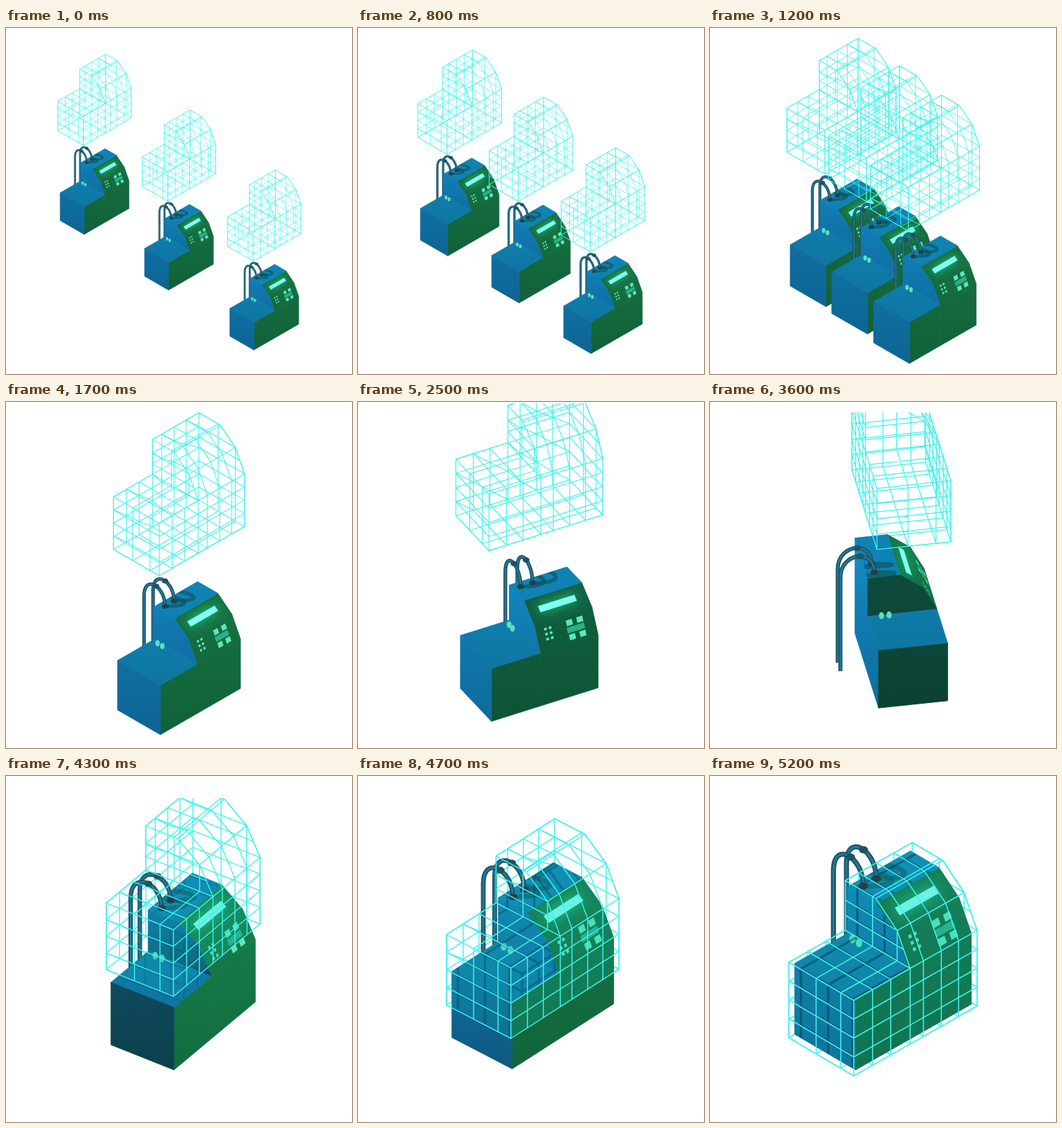
Animation, 500 px wide and 500 px high, one loop 5300 ms. Source, as an HTML page with a canvas:

```html
<!DOCTYPE html>
<html lang="en">
<head>
<meta charset="utf-8">
<style>
  html, body { margin: 0; width: 100%; height: 100%; overflow: hidden; background: #fff; }
  canvas { display: block; width: 500px; height: 500px; }
</style>
</head>
<body>
<canvas id="stage" width="500" height="500"></canvas>
<script>
const ctx = document.getElementById('stage').getContext('2d');
const LOOP = 5300, STEP = 100;

// Key poses, joined by monotone cubic curves.
const TIMES = [0, 500, 800, 1200, 1700, 2500, 3000, 3300, 3600, 4300, 4800, 5200];
const TRACKS = {
  size:   [49, 51.5, 56, 73, 87.6, 93.9, 97, 99.3, 101.7, 110.7, 119, 125.5],
  x:      [250, 250, 250, 250, 250, 247.5, 250, 298, 276.5, 256, 252, 250],
  y:      [350, 355, 364.5, 399.5, 429.5, 413.5, 398, 390, 383, 357.5, 353, 351.5],
  angle:  [45, 45, 45, 45, 45, 28.6, -30, -190, -259.7, -304.6, -313, -315.5],
  lift:   [2.66, 2.66, 2.66, 2.66, 2.66, 2.66, 2.62, 2.5, 2.29, 1, 0.3, -0.03],
  spread: [122, 122, 103, 60, 0, 0, 0, 0, 0, 0, 0, 0],
  clip:   [0, 0, 0, 0, 0, 2, 1, 5, 15, 32, 50, 60]
};

function sample(values, t) {
  let i = 0;
  while (i < TIMES.length - 2 && t > TIMES[i + 1]) i++;
  const slope = k => (values[k + 1] - values[k]) / (TIMES[k + 1] - TIMES[k]);
  const tangent = k => {
    if (k === 0 || k === TIMES.length - 1) return 0;
    const a = slope(k - 1), b = slope(k);
    return a * b > 0 ? 2 * a * b / (a + b) : 0;
  };
  const d = TIMES[i + 1] - TIMES[i], p = (t - TIMES[i]) / d, q = 1 - p;
  return values[i] * q * q * (1 + 2 * p) + values[i + 1] * p * p * (1 + 2 * q)
    + d * p * q * (tangent(i) * q - tangent(i + 1) * p);
}

// The machine: two prisms along its length, each with a (width, height) profile.
const LENGTH = 1.87, STEPBACK = 0.855, ROOF = 1.66;
const BOX = [[0, 0], [0, 1], [1, 1], [1, 0]];
const HOOD = [[0, 0], [0, 1], [0.2, 1.4], [0.53, ROOF], [1, ROOF], [1, 0]];
const ROWS = [0.25, 0.5, 0.75, 1, 1.2, 1.4], RIBS = [0.2, 0.58];
const COLUMNS = [0, 0.153, 0.3, 0.457, 0.565, 0.71, 0.85, 1].map(c => c * LENGTH);

function prism(profile, from, to) {
  return profile.map((p, i) => {
    const q = profile[(i + 1) % profile.length];
    const dw = q[0] - p[0], dh = q[1] - p[1];
    const at = (l, k) => [l, p[0] + dw * k, p[1] + dh * k];
    const rows = dw === 0 ? ROWS.map(h => (h - p[1]) / dh)
      : dh === 0 ? RIBS.map(w => (w - p[0]) / dw) : [];
    const cuts = rows.filter(k => k > 0 && k < 1);
    const columns = COLUMNS.filter(c => c > from + 0.01 && c < to - 0.01);
    const lines = cuts.map(k => [at(from, k), at(to, k)])
      .concat(columns.map(c => [at(c, 0), at(c, 1)]));
    const braces = [];
    if (p[0] === 1 && dw === 0) {
      const ks = [0, ...cuts.sort((a, b) => a - b), 1], cs = [from, ...columns, to];
      for (let c = 1; c < cs.length; c++)
        for (let k = c % 2 + 1; k < ks.length; k += 2)
          braces.push([at(cs[c - 1], ks[k - 1]), at(cs[c], ks[k])]);
    }
    return { points: [at(from, 0), at(to, 0), at(to, 1), at(from, 1)], lines, braces,
      normal: [0, -Math.sign(dh)], top: dh === 0,
      panel: profile === HOOD && (i === 1 || i === 2) ? i : 0 };
  });
}

function cap(profile, l, side, base) {
  const roofAt = w => profile === BOX ? 1 : w < 0.3 ? 1.4 : ROOF;
  const points = profile.map(([w, h]) => [l, w, Math.max(h, base)]);
  const lines = RIBS.map(w => [[l, w, base], [l, w, roofAt(w)]]);
  for (const h of ROWS)
    if (h > base && h < roofAt(1)) lines.push([[l, Math.max(0, (h - 1) / 2), h], [l, 1, h]]);
  return { points: side > 0 ? points.reverse() : points, lines, braces: [], normal: [side, 0] };
}

const FRONT = [...prism(BOX, 0, STEPBACK), cap(BOX, 0, -1, 0)];
const REAR = [...prism(HOOD, STEPBACK, LENGTH), cap(HOOD, STEPBACK, -1, 1), cap(HOOD, LENGTH, 1, 0)];

function camera(x, y, size, degrees) {
  const a = degrees * Math.PI / 180, cos = Math.cos(a), sin = Math.sin(a);
  const project = ([l, w, h]) => {
    const dl = l - LENGTH / 2, dw = w - 0.5;
    return [x + size * (dl * cos - dw * sin), y - size * (0.577 * (dl * sin + dw * cos) + 0.816 * h)];
  };
  return { x, y, size, cos, sin, project };
}

function facing(points) {
  let area = 0;
  points.forEach(([x, y], i) => {
    const [u, v] = points[(i + 1) % points.length];
    area += x * v - u * y;
  });
  return area < 0;
}

function trace(points, path = new Path2D(), close = true) {
  points.forEach(([x, y], i) => i ? path.lineTo(x, y) : path.moveTo(x, y));
  if (close) path.closePath();
  return path;
}

// Colours by how far a wall faces left (-1) or right (1).
const SHADES = [[-1, 16, 122, 174], [-0.66, 15, 108, 160], [-0.55, 14, 68, 82], [0.17, 12, 70, 57],
  [0.48, 15, 90, 59], [0.7, 19, 104, 61], [0.82, 20, 118, 69], [1, 15, 108, 66]];

function shade(nx) {
  let i = 0;
  while (i < SHADES.length - 2 && nx > SHADES[i + 1][0]) i++;
  const a = SHADES[i], b = SHADES[i + 1], k = (nx - a[0]) / (b[0] - a[0]);
  return [1, 2, 3].map(c => a[c] + (b[c] - a[c]) * k);
}

const rgb = (c, k) => `rgb(${c.map(v => Math.round(v * k)).join()})`;

function drawPanel(cam, face) {
  const [low, lowEnd, , high] = face.points;
  const at = (v, u) => cam.project([low[0] + (lowEnd[0] - low[0]) * v,
    high[1] + (low[1] - high[1]) * u, high[2] + (low[2] - high[2]) * u]);
  const patch = (v, u, dv, du) => ctx.fill(trace(
    [at(v - dv, u - du), at(v + dv, u - du), at(v + dv, u + du), at(v - dv, u + du)]));
  ctx.save();
  if (face.panel === 2) {
    ctx.fillStyle = '#80fff0';
    ctx.shadowColor = '#20d090';
    ctx.shadowBlur = cam.size / 6;
    patch(0.495, 0.485, 0.315, 0.125);
  } else {
    ctx.fillStyle = '#5ce8b8';
    for (const u of [0.25, 0.43, 0.61]) for (const v of [0.17, 0.25]) patch(v, u, 0.022, 0.045);
    for (const u of [0.28, 0.79]) for (const v of [0.58, 0.76]) patch(v, u, 0.052, 0.1);
    ctx.fillStyle = '#2cb088';
    patch(0.665, 0.535, 0.15, 0.1);
  }
  ctx.restore();
}

function drawFaces(cam, faces, solid, lit) {
  for (const face of faces) {
    const points = face.points.map(cam.project);
    if (!facing(points)) continue;
    const nx = face.normal[0] * cam.cos - face.normal[1] * cam.sin;
    const tint = turn => face.top ? [15, 120, 166] : shade(nx + (nx < 0 ? turn : 0));
    const fill = ctx.createLinearGradient(cam.x, cam.y - cam.size * 1.5, cam.x, cam.y + cam.size * 0.6);
    fill.addColorStop(0, rgb(tint(-0.14), 1.08));
    fill.addColorStop(0.45, rgb(tint(0), 1));
    fill.addColorStop(1, rgb(tint(0.04), 0.92));
    ctx.fillStyle = ctx.strokeStyle = fill;
    ctx.lineWidth = 0.8;
    const path = trace(points);
    ctx.fill(path);
    ctx.stroke(path);
    solid.addPath(path);
    if (face.top || nx < 0) lit.addPath(path);
    if (face.panel) drawPanel(cam, face);
  }
}

function drawWire(cam, front, width, color) {
  const path = new Path2D();
  for (const face of [...FRONT, ...REAR]) {
    const points = face.points.map(cam.project);
    if (facing(points) !== front) continue;
    trace(points, path);
    const lines = front ? face.lines : face.lines.concat(face.braces);
    lines.forEach(line => trace(line.map(cam.project), path, false));
  }
  ctx.strokeStyle = color;
  ctx.lineWidth = width;
  ctx.stroke(path);
}

// Light and line shadows that the cage casts on the machine as it comes down.
function drawCageLight(cage, solid, lit, strength) {
  const volume = new Path2D();
  for (const face of [...FRONT, ...REAR]) {
    const points = face.points.map(cage.project);
    if (facing(points)) trace(points, volume);
  }
  ctx.save();
  ctx.clip(solid);
  ctx.fillStyle = 'rgba(18,190,180,.2)';
  ctx.fill(volume);
  ctx.clip(lit);
  ctx.translate(cage.size * 0.13, cage.size * 0.07);
  drawWire(cage, true, cage.size / 40, `rgba(5,60,85,${0.5 * strength})`);
  ctx.restore();
}

const HOSES = [1.2, 0.99];

function arch(l) {
  const points = [];
  for (let k = 0; k <= 1.001; k += 0.05)
    points.push([l, 1.37 - 0.49 * k * k * (3 - 2 * k), 1.63 + 1.28 * k * (1 - k) + 0.03 * k]);
  return points;
}

function strokeHose(cam, points) {
  const path = trace(points.map(cam.project), undefined, false);
  for (const [color, width] of [['#23525e', 0.058], ['#1a7c9c', 0.024]]) {
    ctx.strokeStyle = color;
    ctx.lineWidth = cam.size * width;
    ctx.stroke(path);
  }
}

const drawUprights = cam => HOSES.forEach(l => strokeHose(cam, [[l, 1.37, 0], [l, 1.37, 1.64]]));

function dot(cam, point, rx, ry, color) {
  const [x, y] = cam.project(point);
  ctx.fillStyle = color;
  ctx.beginPath();
  ctx.ellipse(x, y, cam.size * rx, cam.size * ry, 0, 0, 7);
  ctx.fill();
}

function drawHoseShadows(cam) {
  const roof = [[STEPBACK, 0.53], [LENGTH, 0.53], [LENGTH, 1], [STEPBACK, 1]];
  ctx.save();
  ctx.clip(trace(roof.map(([l, w]) => cam.project([l, w, ROOF]))));
  ctx.strokeStyle = 'rgba(8,72,66,.5)';
  ctx.lineWidth = cam.size * 0.06;
  for (const l of HOSES) {
    const shadow = arch(l).map(([, w, h]) => {
      const [x, y] = cam.project([l, w, ROOF]);
      return [x + (h - ROOF) * cam.size * 1.5, y];
    });
    ctx.stroke(trace(shadow, undefined, false));
  }
  ctx.restore();
}

function drawArches(cam) {
  for (const l of HOSES) {
    const points = arch(l);
    strokeHose(cam, points);
    dot(cam, points[11], 0.052, 0.042, '#1d5365');
    dot(cam, points[20], 0.055, 0.04, '#233f4a');
  }
}

const drawBulbs = cam => [0.82, 0.71].forEach(w => dot(cam, [0.755, w, 1.06], 0.036, 0.05, '#5ce2bd'));

function drawMachine(pose, x, y) {
  const { size, angle, lift } = pose;
  const cam = camera(x, y, size, angle);
  const cage = camera(x, y - lift * size, size * 1.065, angle);
  const drawCage = front => {
    ctx.save();
    ctx.beginPath();
    ctx.rect(0, pose.clip, 500, 500);
    ctx.clip();
    drawWire(cage, front, size / 80, '#40f2ec');
    ctx.restore();
  };
  const away = cam.sin > 0, solid = new Path2D(), lit = new Path2D();

  drawCage(false);
  if (cam.cos > 0) drawUprights(cam);
  drawFaces(cam, away ? REAR : FRONT, solid, lit);
  if (!away) drawBulbs(cam);
  drawFaces(cam, away ? FRONT : REAR, solid, lit);
  if (away) drawBulbs(cam);
  drawHoseShadows(cam);
  if (lift < 1.5) drawCageLight(cage, solid, lit, 1 - Math.max(0, lift) / 1.5);
  if (cam.cos <= 0) drawUprights(cam);
  drawArches(cam);
  drawCage(true);
}

function render(now) {
  const t = Math.floor(now % LOOP / STEP) * STEP;
  const pose = {};
  for (const name in TRACKS) pose[name] = sample(TRACKS[name], t);
  ctx.fillStyle = '#fff';
  ctx.fillRect(0, 0, 500, 500);
  ctx.lineJoin = 'round';
  const { x, y, spread } = pose;
  if (spread > 0.5) drawMachine(pose, x - spread, y - spread * 0.66);
  drawMachine(pose, x, y);
  if (spread > 0.5) drawMachine(pose, x + spread * 1.01, y + spread * 0.71);
}

const start = performance.now();
function tick() {
  render(performance.now() - start);
  requestAnimationFrame(tick);
}
tick();
</script>
</body>
</html>
```
